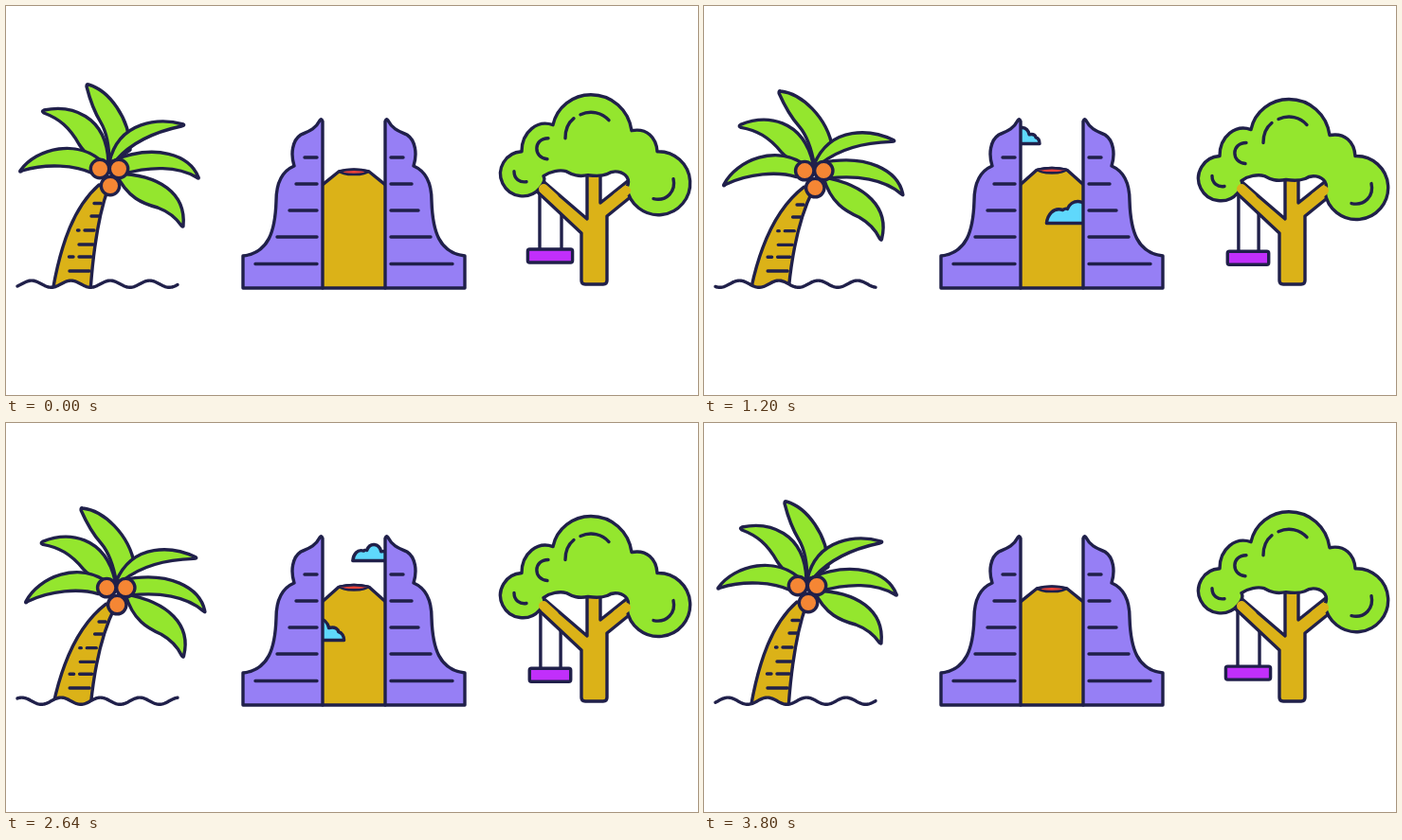
An HTML page that plays this animation: 730 px wide and 411 px high, repeating every 3.84 s.

```html
<!DOCTYPE html>
<html lang="en">
<head>
<meta charset="utf-8">
<title>Island icons</title>
<style>
  html, body { margin: 0; width: 100%; height: 100%; overflow: hidden; background: #fff; }
  svg { display: block; width: 730px; height: 411px; }
  .ink { stroke: #20204a; stroke-width: 3.4; stroke-linejoin: round; stroke-linecap: round; fill: none; }
  .leaf { fill: #94e62e; }
  .wood { fill: #dbb218; }
  .nut { fill: #f58634; }
  .stone { fill: #967ff5; }
  .lava { fill: #ee4339; }
  .cloud { fill: #5fd8fc; }
  .seat { fill: #c12ffb; }
  .tip { stroke: #dbb218; stroke-width: 10; }
</style>
</head>
<body>
<svg viewBox="0 0 730 411">
  <defs>
    <clipPath id="dry"><path id="dryPath"/></clipPath>
    <clipPath id="gap"><rect x="334" y="90" width="66" height="208"/></clipPath>
    <path id="puff" vector-effect="non-scaling-stroke" d="M0 0C1-9 7-17 17-14C20-16 22-15 22-15C26-26 41-26 44-13C51-15 54-11 54-9C58-8 60-4 60 0Z"/>
    <g id="pillar">
      <path class="stone" d="M334 298V122Q333 118 331 121C326 131 317 133 311 136C302 142 300 156 304 169C290 175 285 190 285 206C284 238 277 261 250 264V298Z"/>
      <path d="M315 160H328M306 188H328M299 216H328M286 244H328M263 272.5H328"/>
    </g>
  </defs>

  <g class="ink">
    <g clip-path="url(#dry)">
      <path id="trunk" class="wood"/>
      <path id="bands"/>
    </g>
    <path id="wave"/>
    <g id="crown">
      <g id="leaves"></g>
      <g class="nut">
        <circle cx="99" cy="172" r="9.7"/>
        <circle cx="119" cy="172" r="9.7"/>
        <circle cx="110" cy="190" r="9.7"/>
      </g>
    </g>
  </g>

  <g class="ink">
    <g clip-path="url(#gap)">
      <path id="hill" class="wood"/>
      <path id="crater" class="lava" stroke-width="2.6"/>
      <use id="high" class="cloud" href="#puff"/>
      <use id="low" class="cloud" href="#puff"/>
    </g>
    <path d="M334 298H400"/>
    <use href="#pillar"/>
    <use href="#pillar" transform="translate(734 0) scale(-1 1)"/>
  </g>

  <g class="ink">
    <path id="ropes"/>
    <rect id="seat" class="seat" height="14" rx="2"/>
    <path class="wood" d="M607 240L556 192L563 182L613 225V168H627V208L657 184L666 196L634 222V290Q634 294 630 294H611Q607 294 607 290Z"/>
    <g id="canopy">
      <path class="leaf" d="M567 179C574 174 584 172 591 174C598 178 604 180 614 178C622 179 629 179 634 177C641 172 651 174 655 180Q658 185 655 191A33.5 33.5 0 1 0 687 153C686 138 676 128 660 131C657 109 639 93 617 93C598 93 581 106 577 125C561 119 544 132 544 153A23.6 23.6 0 1 0 563 192Q570 184 567 179Z"/>
      <path d="M590 139C590 129 594 122 599 118M606 114C617 109 629 112 636 120M572 139C556 139 556 160 571 161M536 174C536 182 542 186 549 185M704 182C707 195 697 206 683 203"/>
    </g>
    <path class="tip" d="M567 193L578 203M654 195L645 202"/>
  </g>
</svg>
<script>
const LOOP = 3840, STEP = 40, TAU = 2 * Math.PI;
const $ = id => document.getElementById(id);
const draw = (id, d) => $(id).setAttribute('d', d);
const move = (el, value) => el.setAttribute('transform', value);

// outline, pivot, droop in degrees; back to front
const leafTable = [
  ['M187 232C190 198 162 178 116 177C128 203 145 209 160 213Q176 219 185 232Q187 234 187 232Z', 106, 195, 13],
  ['M203 181C194 158 159 144 110 164L122 178C152 169 181 169 201 181Q204 183 203 181Z', 110.6, 186, 14],
  ['M87 83C108 89 131 118 131 152L109 167C109 146 106 133 100 123C92 110 88 97 85 85Q85 82 87 83Z', 109, 165, -14],
  ['M187 125C162 118 119 121 109 165L116 163C130 147 152 134 185 127Q189 126 187 125Z', 109, 165, 15],
  ['M40 110C68 104 106 115 108 165C92 163 84 157 77 146C67 128 56 119 40 113Q37 111 40 110Z', 109, 165, -15],
  ['M15 174C32 150 77 139 104 167L92 177C73 168 43 166 17 174Q14 176 15 174Z', 102, 190, -12]
];
const leaves = leafTable.map(([d]) => {
  const leaf = document.createElementNS('http://www.w3.org/2000/svg', 'path');
  leaf.setAttribute('class', 'leaf');
  leaf.setAttribute('d', d);
  return $('leaves').appendChild(leaf);
});

// y, then start and end of each dash on the trunk
const bandTable = [
  [208.5, 93, 100], [222, 90, 98], [237, 83, 93], [237, 75.5, 77],
  [252, 77, 92], [265, 77, 90], [265, 66.5, 71], [280, 67, 88]
];

function palm(t, p) {
  const bend = (x, y) => {
    const k = p * Math.max(0, (296 - y) / 105) ** 2;
    return `${x + 10.5 * k} ${y + 3 * k}`;
  };
  draw('trunk', `M${bend(98, 189)}C${bend(72, 212)} ${bend(58, 250)} 49 302L89 302C${bend(92, 258)} ${bend(97, 222)} ${bend(108, 192)}Z`);
  draw('bands', bandTable.map(([y, a, b]) => `M${bend(a, y)}L${bend(b, y)}`).join(''));

  const pts = [];
  for (let x = 12; x <= 181; x++) {
    const y = 293.7 - 3.6 * Math.cos(TAU * ((x - 27) / 41.5 - t / 960));
    pts.push(`${x} ${y.toFixed(2)}`);
  }
  const line = 'M' + pts.join('L');
  draw('wave', line);
  draw('dryPath', line + 'V0H12Z');

  move($('crown'), `translate(${10.5 * p} ${3 * p})`);
  leaves.forEach((leaf, i) => {
    const [, x, y, angle] = leafTable[i];
    move(leaf, `rotate(${angle * p} ${x} ${y})`);
  });
}

function gate(t, p) {
  const y = 173 - 2.4 * p;
  draw('hill', `M330 192L351 ${y + 2}Q367 ${y - 2} 383 ${y + 2}L404 192V302H330Z`);
  draw('crater', `M352 ${y + 1.5}Q367 ${y - 2} 382 ${y + 1.5}Q380 ${y + 5} 367 ${y + 5}Q354 ${y + 5} 352 ${y + 1.5}Z`);
  move($('high'), `translate(${303 + 0.0365 * (t - 920)} 145.5) scale(.68 .74)`);
  move($('low'), `translate(${374 - 0.045 * (t - 920)} 229.5)`);
}

function tree(t, p) {
  move($('canopy'), `translate(0 ${0.7 + 7 * p})`);
  const c = Math.cos(TAU * t / 1920);
  const width = 45 + 2.2 * c, y = 262.6 - 6 * c * c + 0.4 * c;
  const mid = 574, half = width * 0.244;
  const seat = $('seat');
  seat.setAttribute('x', mid - width / 2);
  seat.setAttribute('y', y);
  seat.setAttribute('width', width);
  draw('ropes', `M${mid + 0.5 - half} 194V${y}M${mid + 0.5 + half} 215V${y}`);
}

function frame(now) {
  const t = Math.floor((now % LOOP) / STEP) * STEP;
  const p = (1 - Math.cos(TAU * t / LOOP)) / 2;
  palm(t, p);
  gate(t, p);
  tree(t, p);
  requestAnimationFrame(frame);
}
frame(0);
</script>
</body>
</html>
```
